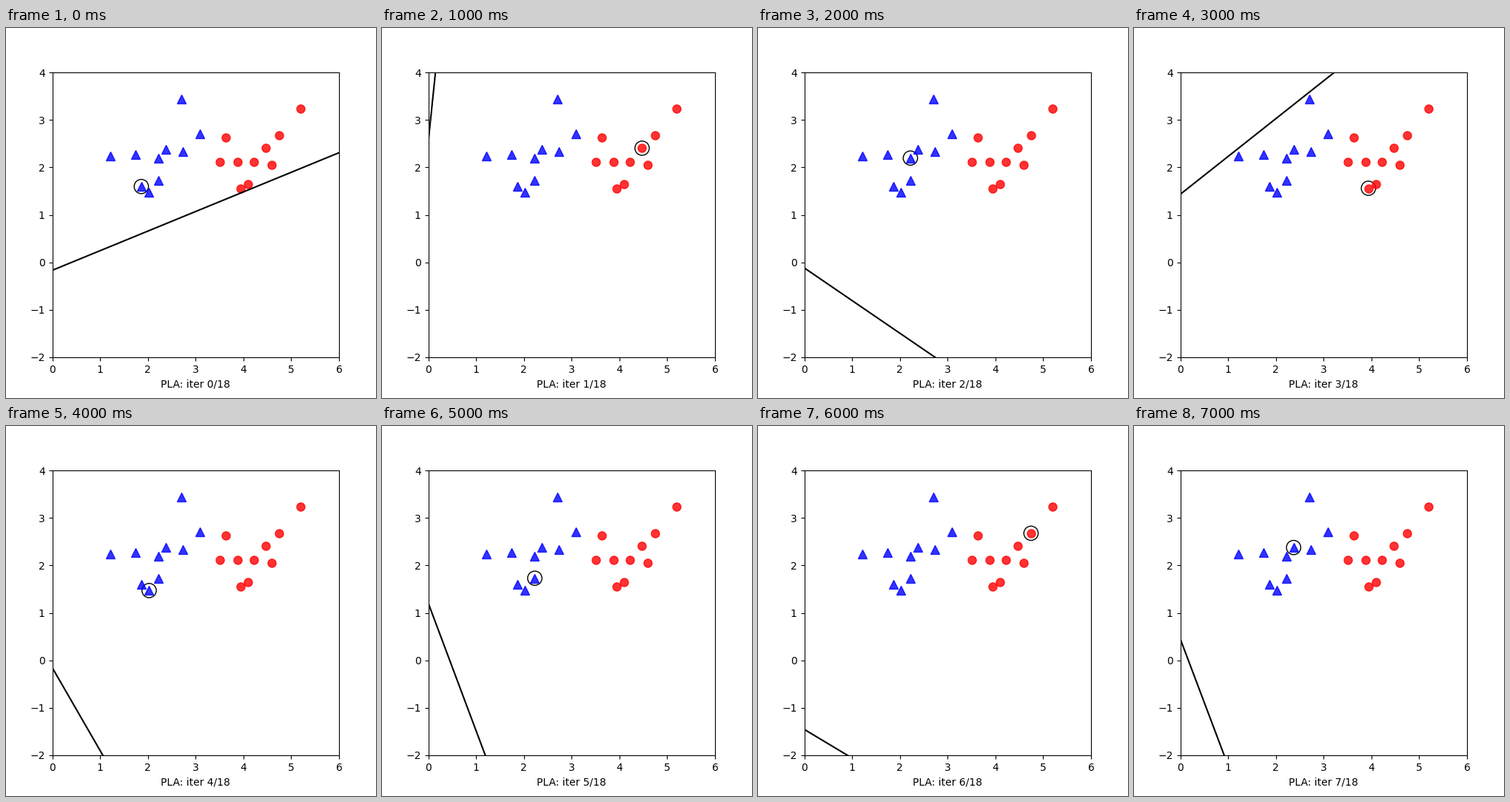
A matplotlib script for the animation above (8000 ms loop, 500 by 500 pixels).

```python
import numpy as np
import matplotlib.pyplot as plt
from matplotlib.animation import FuncAnimation

STEPS = 8
TOTAL = 18

# Two correlated Gaussian clouds, ten points each
rng = np.random.RandomState(2)
z = rng.randn(20, 2)
along, across = -0.5 * z[:, 0], np.sqrt(0.05) * z[:, 1]
points = np.column_stack([along - across, along + across]) + [2, 2]
points[10:, 0] += 2
labels = np.repeat([1, -1], 10)

# Perceptron weights; each step corrects the one point picked
picked = [7, 10, 0, 18, 3, 6, 14, 9]
weights = [rng.randn(3)]
for k in picked[:-1]:
    weights.append(weights[-1] + labels[k] * np.array([1, *points[k]]))

plt.rcParams["font.family"] = "DejaVu Sans"
fig, ax = plt.subplots(figsize=(5, 5), dpi=100)
ax.plot(*points[:10].T, "b^", markersize=8, alpha=0.8)
ax.plot(*points[10:].T, "ro", markersize=8, alpha=0.8)
boundary, = ax.plot([], [], "k")
ring = ax.add_patch(plt.Circle((0, 0), 0.15, color="k", fill=False))
ax.axis([0, 6, -2, 4])

span = np.array([-100, 100])


def update(i):
    w0, w1, w2 = weights[i]
    boundary.set_data(span, -(w0 + w1 * span) / w2)
    ring.center = tuple(points[picked[i]])
    ax.set_xlabel(f"PLA: iter {i}/{TOTAL}")
    return boundary, ring


anim = FuncAnimation(fig, update, frames=STEPS, interval=1000, repeat=True,
                     repeat_delay=0, blit=False)
plt.show()
```
